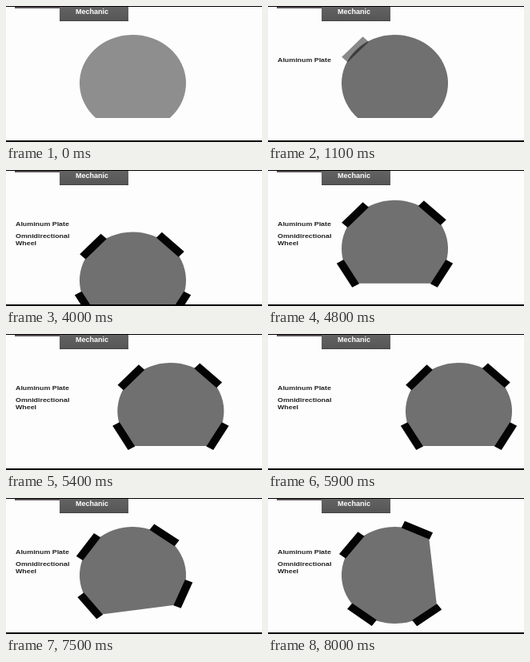
Animation of 320x170 px, one loop 8100 ms. Source, as an HTML page with a canvas:

```html
<!DOCTYPE html>
<html lang="en">
<head>
<meta charset="utf-8">
<title>Mechanic</title>
<style>
html, body { margin: 0; width: 100%; height: 100%; overflow: hidden; background: #fdfdfd; }
canvas { display: block; width: 320px; height: 170px; }
</style>
</head>
<body>
<canvas id="stage" width="320" height="170"></canvas>
<script>
const ctx = document.getElementById('stage').getContext('2d');
const LOOP = 8100;
const ASPECT = 1.1; // the slide is shown slightly widened
const RAD = Math.PI / 180;
const CENTER = { x: 158.5, y: 96.5 };
const BODY = { r: 60.5, cut: 43.5 };
const WHEEL = { r: 61.7, length: 35, depth: 9.2 };

// Wheel position on the rim in degrees, and when its fade starts
const wheels = [
  { angle: 223.2, start: 870 },
  { angle: 313.6, start: 1470 },
  { angle: 30.3, start: 2070 },
  { angle: 149.7, start: 2670 }
];

const ramp = (t, from, to) => Math.min(1, Math.max(0, (t - from) / (to - from)));
const ease = (t, from, to) => (1 - Math.cos(Math.PI * ramp(t, from, to))) / 2;

function label(text, x, y, size, color, alpha = 1, align = 'left') {
  if (alpha <= 0) return;
  ctx.save();
  ctx.globalAlpha = alpha;
  ctx.translate(x, y);
  ctx.scale(ASPECT, 1);
  ctx.font = `bold ${size}px "Liberation Sans", Arial, sans-serif`;
  ctx.textAlign = align;
  ctx.fillStyle = color;
  ctx.fillText(text, 0, 0);
  ctx.restore();
}

function drawHeader() {
  ctx.fillStyle = '#5b5357';
  ctx.fillRect(11, 1, 56, 2);
  const shade = ctx.createLinearGradient(0, 1, 0, 19);
  shade.addColorStop(0, '#636363');
  shade.addColorStop(1, '#555555');
  ctx.fillStyle = shade;
  ctx.fillRect(67, 1, 86, 18);
  ctx.fillStyle = '#444';
  ctx.fillRect(67, 18, 86, 1);
  label('Mechanic', 107.5, 10.4, 8.2, '#fff', 1, 'center');
}

function drawBody(alpha) {
  const end = Math.asin(BODY.cut / BODY.r);
  ctx.globalAlpha = alpha;
  ctx.fillStyle = '#707070';
  ctx.beginPath();
  ctx.arc(0, 0, BODY.r, Math.PI - end, end);
  ctx.closePath();
  ctx.fill();
}

function drawWheel(wheel, t) {
  ctx.save();
  ctx.globalAlpha = ramp(t, wheel.start, wheel.start + 500);
  ctx.fillStyle = '#040404';
  ctx.rotate(wheel.angle * RAD);
  ctx.fillRect(WHEEL.r - WHEEL.depth / 2, -WHEEL.length / 2, WHEEL.depth, WHEEL.length);
  ctx.restore();
}

function drawRobot(t) {
  const dx = 80 * (ease(t, 4870, 5820) - ease(t, 6050, 7130));
  const dy = 60 * (ease(t, 3620, 4230) - ease(t, 4250, 4870));
  const turn = -360 * ease(t, 7310, 9310);
  ctx.save();
  ctx.translate(CENTER.x + dx, CENTER.y + dy);
  ctx.scale(ASPECT, 1);
  ctx.rotate(turn * RAD);
  drawBody(t < 300 ? 0.78 : 1);
  wheels.forEach(wheel => drawWheel(wheel, t));
  ctx.restore();
}

function draw(t) {
  ctx.fillStyle = '#fdfdfd';
  ctx.fillRect(0, 0, 320, 170);
  drawHeader();

  const plate = ramp(t, 350, 850);
  const omni = ramp(t, 3250, 3700);
  label('Aluminum Plate', 12, 70.2, 8.05, '#222', plate);
  label('Omnidirectional', 12, 85, 8.05, '#222', omni);
  label('Wheel', 12, 94.2, 8.05, '#222', omni);

  drawRobot(t);

  ctx.fillStyle = '#000';
  ctx.fillRect(0, 0, 320, 1);
  ctx.fillRect(0, 168, 320, 2);
}

const began = performance.now();
function tick() {
  draw((performance.now() - began) % LOOP);
  requestAnimationFrame(tick);
}
tick();
</script>
</body>
</html>
```
